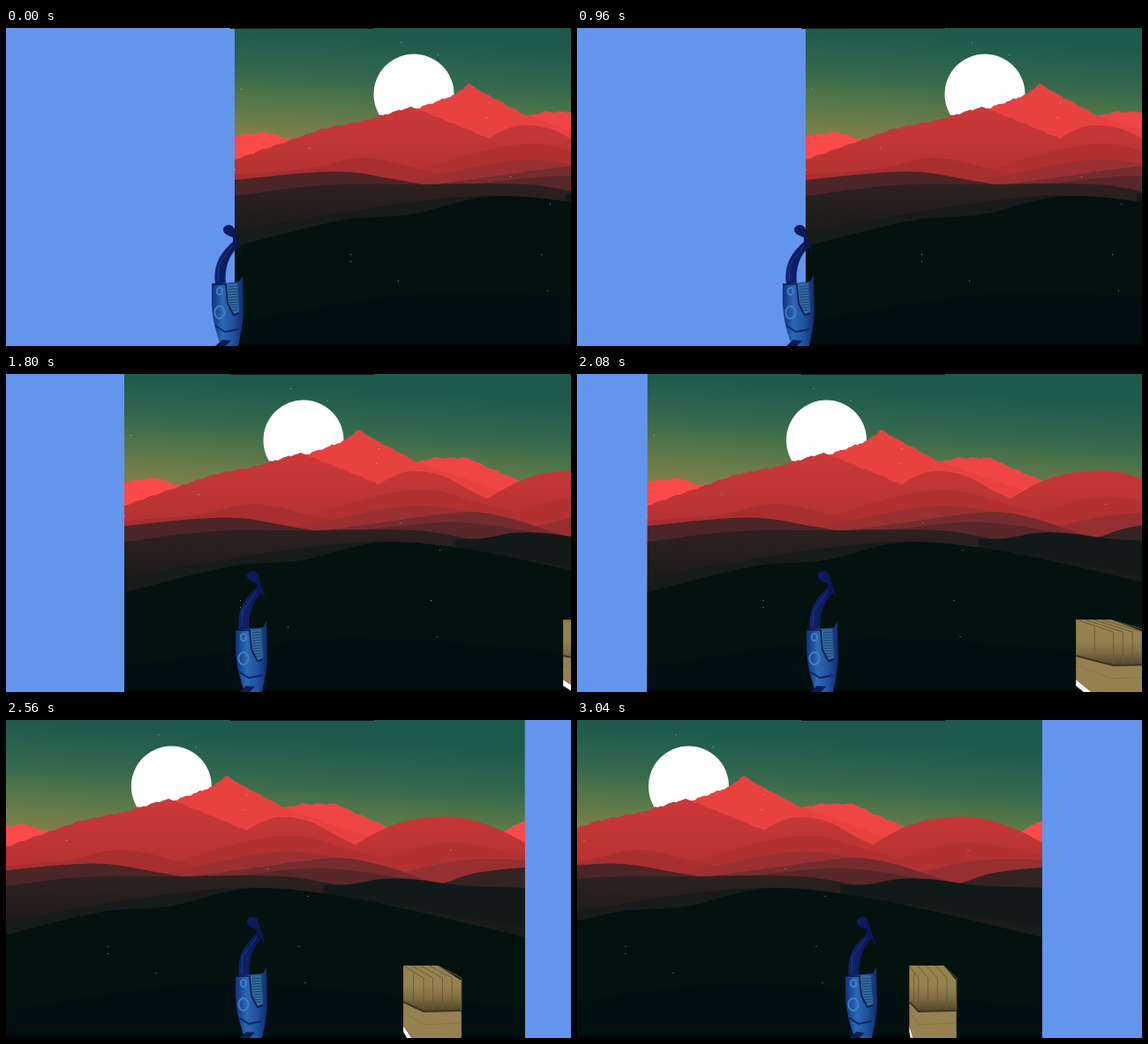
An HTML page with a canvas for the animation above (3.08 s loop, 640 px wide and 360 px high).

```html
<!DOCTYPE html>
<html lang="en">
<head>
<meta charset="utf-8">
<title>Red mountains</title>
<style>
html, body { margin: 0; width: 100%; height: 100%; overflow: hidden; background: #6495ed; }
canvas { display: block; width: 640px; height: 360px; }
</style>
</head>
<body>
<canvas id="stage" width="640" height="360"></canvas>
<script>
const ctx = document.getElementById('stage').getContext('2d');
const LOOP = 3080, STEP = 40, W = 640, H = 360, LAND = 603.5;
const LEFT = -76.5, RIGHT = 259;

const clamp = (v, lo, hi) => Math.min(hi, Math.max(lo, v));

// The walk gains a little speed; the camera follows it between its two stops
function pose(t) {
  const s = t - 1360;
  const walk = Math.min(RIGHT + 22.5, 218 - s * (.1887 + 5e-6 * s));
  const cam = clamp(walk, LEFT, RIGHT);
  return { cam, shift: Math.round(1.2 * (cam - walk)) };
}

function poly(fill, ...p) {
  ctx.beginPath();
  for (let i = 0; i < p.length; i += 2) ctx.lineTo(p[i], p[i + 1]);
  ctx.fillStyle = fill;
  ctx.fill();
}

function line(color, width, ...p) {
  ctx.beginPath();
  for (let i = 0; i < p.length; i += 2) ctx.lineTo(p[i], p[i + 1]);
  ctx.strokeStyle = color;
  ctx.lineWidth = width;
  ctx.stroke();
}

function shape(fill, d) {
  ctx.fillStyle = fill;
  ctx.fill(new Path2D(d));
}

function blend(x0, y0, x1, y1, ...colors) {
  const g = ctx.createLinearGradient(x0, y0, x1, y1);
  colors.forEach((c, i) => g.addColorStop(i / (colors.length - 1), c));
  return g;
}

const bumps = x => Math.sin(x * .37) * .7 + Math.sin(x * .9 + 1) * .5;

// Fills below a skyline through key points; sharp ones are straight with small bumps
function skyline(fill, sharp, p) {
  const last = p.length / 2 - 1;
  const X = i => p[2 * clamp(i, 0, last)], Y = i => p[2 * clamp(i, 0, last) + 1];
  const slope = i => (Y(i + 1) - Y(i - 1)) / (X(i + 1) - X(i - 1));
  ctx.beginPath();
  ctx.moveTo(X(0), H);
  for (let i = 0; i < last; i++) {
    const d = X(i + 1) - X(i);
    ctx.lineTo(X(i), Y(i));
    if (sharp) {
      for (let x = X(i) + 3; x < X(i + 1) - 2; x += 3) {
        ctx.lineTo(x, Y(i) + (Y(i + 1) - Y(i)) * (x - X(i)) / d + bumps(x));
      }
      ctx.lineTo(X(i + 1), Y(i + 1));
    } else {
      ctx.bezierCurveTo(X(i) + d / 3, Y(i) + slope(i) * d / 3,
        X(i + 1) - d / 3, Y(i + 1) - slope(i + 1) * d / 3, X(i + 1), Y(i + 1));
    }
  }
  ctx.lineTo(X(last), H);
  ctx.fillStyle = fill;
  ctx.fill();
}
const ridge = (fill, ...p) => skyline(fill, true, p);
const hill = (fill, ...p) => skyline(fill, false, p);

function sky() {
  ctx.fillStyle = blend(0, 125, 7.5, 0, '#84804a', '#6a7c4a', '#4f7549', '#36694e', '#28614e', '#1e5a4c');
  ctx.fillRect(0, 0, LAND, 190);
  ctx.fillStyle = '#fff';
  ctx.beginPath();
  ctx.arc(203, 75, 45.5, 0, Math.PI * 2);
  ctx.fill();
}

function redRange() {
  const red = blend(0, 90, 0, 160, '#cb3938', '#b73333');
  ridge('#fa4a4a', 0, 122, 36, 118, 65, 127);
  ridge('#fa4a4a', 570, 131, 604, 113);
  ridge('#f04545', 330, 100, 350, 95, 390, 95, 408, 104, 465, 128);
  ridge('#e84240', 195, 95, 232, 82, 250, 75, 265, 63, 284, 74, 330, 99, 455, 142);
  ridge(red, 0, 149, 60, 128, 100, 114, 150, 104, 200, 89, 262, 114, 330, 143);
  hill(red, 400, 148, 446, 122, 480, 112, 528, 110, 570, 122, 604, 139);
  hill(red, 270, 137, 300, 118, 325, 110, 360, 115, 400, 136, 450, 156);
  hill('#b13131', 210, 160, 290, 137, 345, 131, 400, 145, 470, 164);
  hill('#b23232', 430, 160, 515, 139, 604, 153);
  hill('#a72f2f', 0, 166, 85, 159, 146, 147, 215, 161, 260, 172);
  hill('#9a3031', 200, 173, 330, 149, 430, 164, 500, 180);
  hill('#963030', 450, 176, 530, 159, 604, 158);
}

function darkRange() {
  hill('#742c2f', 220, 178, 300, 167, 350, 160, 395, 156, 440, 164, 506, 186);
  hill('#582729', 260, 178, 380, 168, 506, 187);
  hill('#4b2527', 0, 172, 80, 164, 130, 163, 185, 172, 225, 179);
  hill('#352324', 490, 188, 510, 185, 540, 175, 570, 170, 604, 167);
  hill(blend(0, 176, 0, 225, '#2d2121', '#1e1c1b'), 0, 190, 100, 178, 195, 177, 330, 177, 400, 188);
  hill('#121a19', 375, 187, 406, 186, 440, 180, 475, 180, 530, 187, 604, 190);
  hill('#171b19', 0, 230, 110, 211, 210, 196, 300, 190, 420, 204, 604, 235);
  hill('#04120f', 0, 247, 125, 217, 200, 211, 285, 191, 366, 195, 455, 211, 604, 246);
  hill('#020f11', 0, 331, 250, 299, 604, 325);
}

function stars() {
  let seed = 11;
  const random = () => (seed = seed * 16807 % 2147483647) / 2147483647;
  ctx.fillStyle = 'rgba(215, 225, 210, .6)';
  for (let i = 0; i < 15; i++) ctx.fillRect(Math.floor(random() * LAND), Math.floor(random() * H), 1, 1);
}

function landscape(x) {
  ctx.save();
  ctx.translate(x, 0);
  ctx.beginPath();
  ctx.rect(0, 0, LAND, H);
  ctx.clip();
  sky();
  redRange();
  darkRange();
  stars();
  ctx.fillStyle = '#010707';
  ctx.fillRect(0, 357, LAND, 3);
  ctx.restore();
}

// Wooden box: the near face slides faster than the far one
function crate(cam) {
  const far = 498 + 1.21 * (cam - 24), near = 529 + 1.415 * (cam - 24);
  const farR = far + 39, nearR = near + 43;
  if (far > W) return;

  poly('#fff', far, 346, near, 380, near - 4, 384, far, 353);
  poly('#968250', far, 278, farR, 278, nearR, 295, nearR, H, near, 380, far, 346);

  // Planks darken towards the ledge
  const shade = blend(0, 300, 0, 330, 'rgba(60, 50, 30, 0)', 'rgba(60, 50, 30, .25)', 'rgba(60, 50, 30, .8)');
  poly(shade, far, 278, near, 295, nearR, 295, nearR, 329, near, 330, far, 318);
  for (let i = 0; i <= 4; i++) {
    const a = far + i * 39 / 4, b = near + i * 43 / 4;
    line('#6b5c38', 1, a, 278, b, 292, b, 328);
  }
  line('#6b5c38', 1, (far + near) / 2, 287, (far + near) / 2, 322);
  line('#40361f', 2, far, 319, near, 330, nearR, 329);
  line('#87744a', 1, far, 330, near, 345, nearR, 343);
}

function figure(shift) {
  ctx.save();
  ctx.translate(shift, 0);

  // Neck and head
  shape(blend(264, 0, 292, 0, '#10226c', '#0a1550'),
    'M264 290C262 272 266 258 284 242L284 237C276 234 273 232 273 228' +
    'C274 222 284 221 286 228C286 234 293 244 293 255L290 248C280 256 274 272 276 290Z');
  line('#1c3a90', 1, 267, 286, 268, 268, 284, 246);

  // Body
  shape(blend(260, 0, 297, 0, '#10307c', '#2c68b4', '#1f519c', '#0f2768'),
    'M260 290L291 287L295 280L296 320C295 340 292 350 290 360L270 360C266 345 261 334 260 312Z');
  ctx.strokeStyle = '#3f80c2';
  ctx.lineWidth = 2;
  for (const [y, r] of [[298, 4], [322, 7]]) {
    ctx.beginPath();
    ctx.ellipse(269, y, r * .8, r, 0, 0, Math.PI * 2);
    ctx.stroke();
  }
  line('#0d2468', 2, 264, 337, 275, 344, 290, 341);
  poly('#0c1c50', 264, 360, 272, 353, 282, 354, 276, 360);

  // Striped panel
  poly('#34699c', 277, 290, 289, 289, 291, 321, 285, 324, 278, 312);
  for (let y = 292; y < 320; y += 3) line('#1d4478', 1, 279, y + 1, 290, y);
  line('#0a1745', 1.5, 260, 290, 276, 290, 278, 312, 285, 325, 291, 323);
  ctx.restore();
}

function topStrip() {
  ctx.fillStyle = '#0b1a19';
  ctx.fillRect(254, 0, 163, 1);
}

function draw(now) {
  const { cam, shift } = pose(Math.floor((now % LOOP) / STEP) * STEP);
  ctx.fillStyle = '#6495ed';
  ctx.fillRect(0, 0, W, H);
  landscape(cam);
  crate(cam);
  figure(shift);
  topStrip();
}

const start = performance.now();
function tick() {
  draw(performance.now() - start);
  requestAnimationFrame(tick);
}
tick();
</script>
</body>
</html>
```
